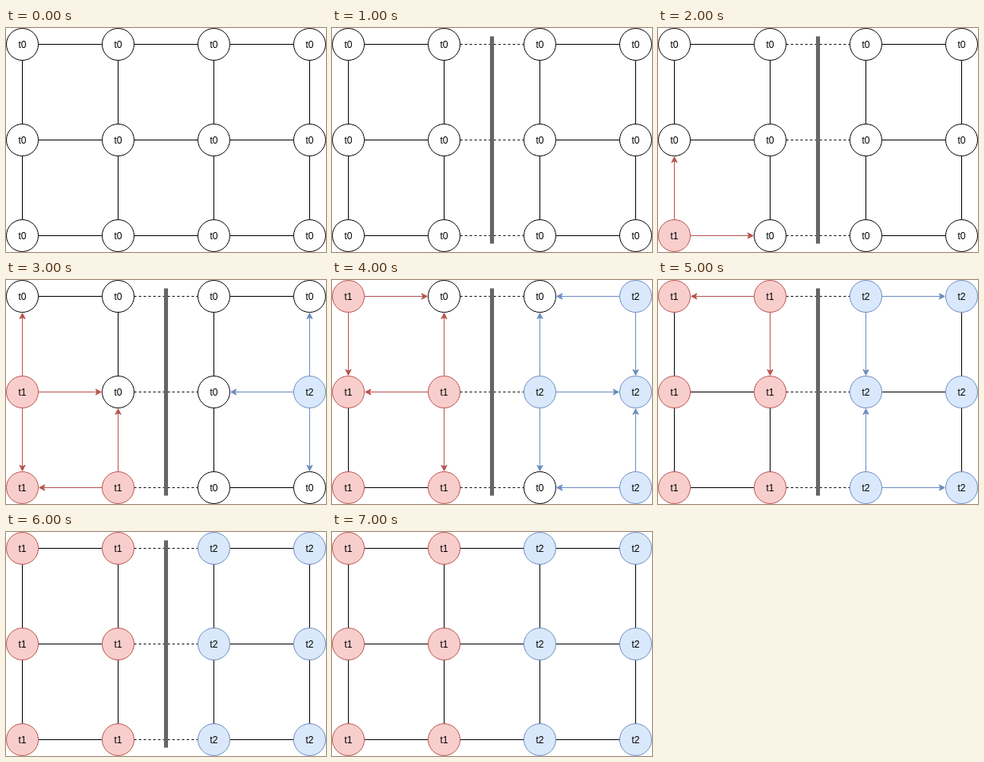
Recreate the animation shown at these times as an HTML page with a canvas. Size 401 by 281 pixels, loop 8 s.

```html
<!DOCTYPE html>
<html lang="en">
<head>
<meta charset="utf-8">
<style>
  html, body { margin: 0; width: 100%; height: 100%; overflow: hidden; background: #fff; }
  canvas { display: block; }
</style>
</head>
<body>
<canvas id="stage" width="401" height="281"></canvas>
<script>
const ctx = document.getElementById('stage').getContext('2d');
const COLS = 4, ROWS = 3, GAP = 120, RADIUS = 20;
const STEP_MS = 1000, STEPS = 8;
const SPLIT_FROM = 1, SPLIT_TO = 6;

// Nodes ("column,row") that adopt a new value and broadcast it, per step.
const senders = {
  2: ['0,2'],
  3: ['0,1', '1,2', '3,1'],
  4: ['0,0', '1,1', '3,0', '2,1', '3,2'],
  5: ['1,0', '2,0', '2,2']
};

const styles = {
  t0: { fill: '#ffffff', stroke: '#000000' },
  t1: { fill: '#f8cecc', stroke: '#b85450' },
  t2: { fill: '#dae8fc', stroke: '#6c8ebf' }
};

const nodes = [];
for (let row = 0; row < ROWS; row++) {
  for (let col = 0; col < COLS; col++) {
    nodes.push({ col, row, key: `${col},${row}`, x: col * GAP + 20.5, y: row * GAP + 20.5 });
  }
}

const edges = [];
for (const a of nodes) {
  for (const b of nodes) {
    const right = b.col === a.col + 1 && b.row === a.row;
    const below = b.row === a.row + 1 && b.col === a.col;
    if (right || below) edges.push({ a, b, crossing: right && a.col === 1 });
  }
}

function valueAt(node, step) {
  for (let s = 0; s <= step; s++) {
    if (senders[s]?.includes(node.key)) return node.col < 2 ? 't1' : 't2';
  }
  return 't0';
}

// Draws along the x axis from the rim of one node to the rim of the other.
function link(from, to, color, { arrow = false, dashed = false } = {}) {
  ctx.save();
  ctx.translate(from.x, from.y);
  ctx.rotate(Math.atan2(to.y - from.y, to.x - from.x));
  ctx.strokeStyle = ctx.fillStyle = color;
  ctx.setLineDash(dashed ? [3, 3] : []);
  const end = GAP - RADIUS, tip = end - 1.12;
  ctx.beginPath();
  ctx.moveTo(RADIUS, 0);
  ctx.lineTo(arrow ? tip - 5.25 : end, 0);
  ctx.stroke();
  if (arrow) {
    ctx.beginPath();
    ctx.moveTo(tip, 0);
    ctx.lineTo(tip - 7, 3.5);
    ctx.lineTo(tip - 5.25, 0);
    ctx.lineTo(tip - 7, -3.5);
    ctx.closePath();
    ctx.fill();
    ctx.stroke();
  }
  ctx.restore();
}

function drawNode(node, value) {
  const { fill, stroke } = styles[value];
  ctx.beginPath();
  ctx.arc(node.x, node.y, RADIUS, 0, Math.PI * 2);
  ctx.fillStyle = fill;
  ctx.fill();
  ctx.strokeStyle = stroke;
  ctx.stroke();
  ctx.fillStyle = '#000';
  ctx.fillText(value, node.x, node.y + 4.5);
}

function draw(step) {
  const split = step >= SPLIT_FROM && step <= SPLIT_TO;
  const sending = senders[step] || [];
  ctx.fillStyle = '#fff';
  ctx.fillRect(0, 0, 401, 281);
  ctx.lineWidth = 1;
  ctx.miterLimit = 10;
  ctx.font = '12px "Liberation Sans", Arial, sans-serif';
  ctx.textAlign = 'center';

  for (const { a, b, crossing } of edges) {
    if (crossing) link(a, b, '#000', { dashed: split });
    else if (sending.includes(a.key)) link(a, b, styles[valueAt(a, step)].stroke, { arrow: true });
    else if (sending.includes(b.key)) link(b, a, styles[valueAt(b, step)].stroke, { arrow: true });
    else link(a, b, '#000');
  }
  for (const node of nodes) drawNode(node, valueAt(node, step));
  if (split) {
    ctx.fillStyle = '#666';
    ctx.fillRect(198, 10.5, 5, 260);
  }
}

const start = performance.now();
function tick() {
  draw(Math.floor((performance.now() - start) / STEP_MS) % STEPS);
  requestAnimationFrame(tick);
}
tick();
</script>
</body>
</html>
```
